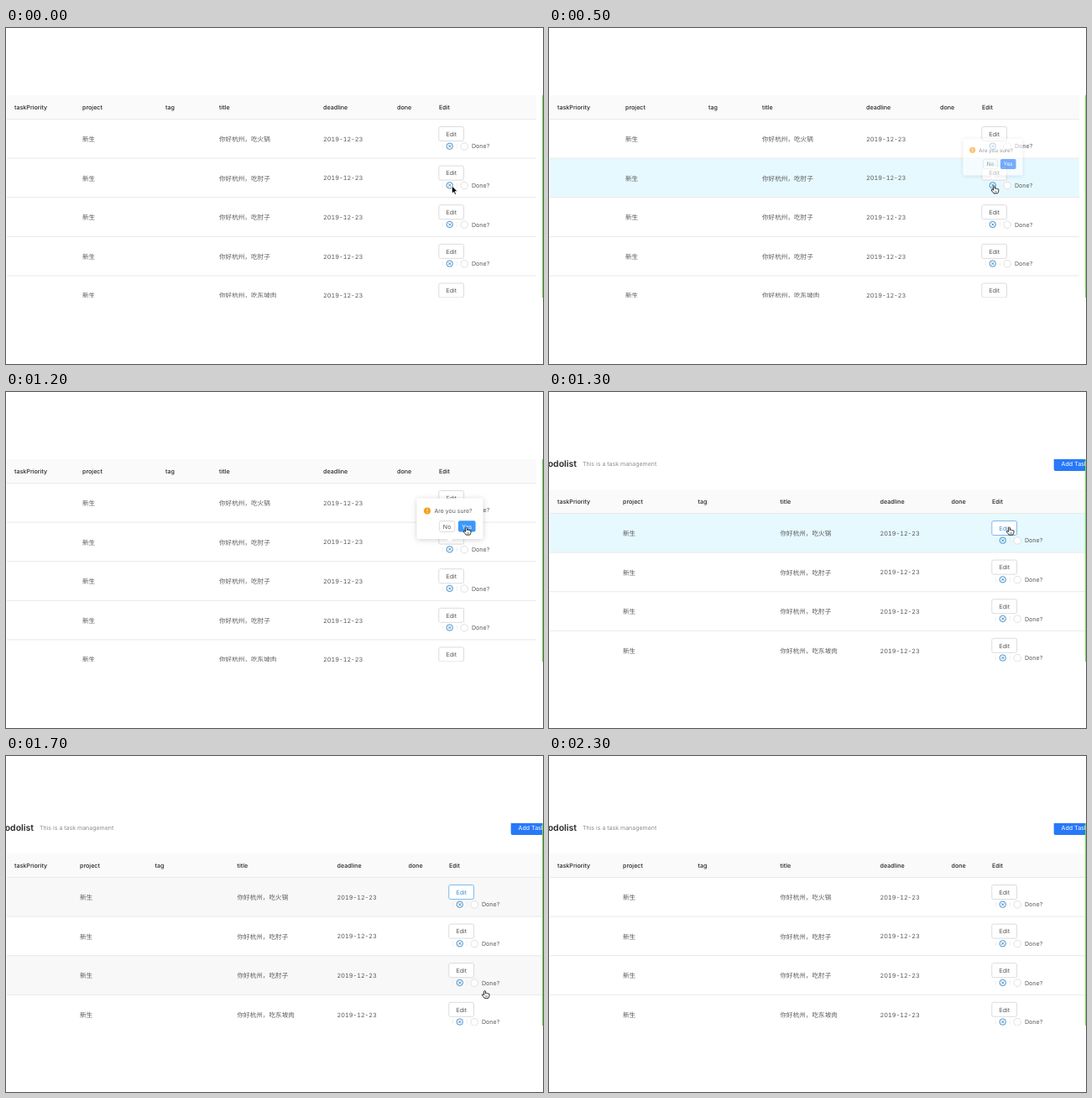
Write an HTML page that moves like this. It is 640 by 400 pixels and loops after 2400 ms.

```html
<!DOCTYPE html>
<html lang="zh-CN">
<head>
<meta charset="utf-8">
<title>Task table</title>
<style>
html, body { margin: 0; width: 100%; height: 100%; overflow: hidden; background: #fff; }
svg { display: block; width: 640px; height: 400px; }
text { font: 7.1px Inter, "Noto Sans CJK SC", sans-serif; fill: #595959; text-rendering: geometricPrecision; }
.head { font-weight: 500; font-size: 7.15px; fill: #262626; }
.cjk { font: 7.6px "Noto Sans CJK SC", "Noto Sans CJK", sans-serif; }
.date { font-size: 7.3px; font-variant-numeric: tabular-nums; }
.brand { font-size: 10.5px; font-weight: 600; fill: #262626; }
.note { font-size: 7px; fill: #8c8c8c; }
.light { fill: #fff; }
.ask { font-size: 6.95px; }
.mid { text-anchor: middle; }
.end { text-anchor: end; }
.shadow { filter: drop-shadow(0 1px 3px rgba(0, 0, 0, .18)); }
</style>
</head>
<body>
<svg viewBox="0 0 640 400">
  <clipPath id="window"><rect y="80" width="640" height="241"/></clipPath>
  <g id="scene" clip-path="url(#window)"></g>
</svg>
<script>
const STEP = 100, LOOP = 2400, ROW = 46.6;
const BLUE = '#2878fa', LINK = '#3585c6';
const scene = document.getElementById('scene');
const HEADS = ['taskPriority', 'project', 'tag', 'title', 'deadline', 'done', 'Edit'];
const HOVER = ['#fff', '#f8f8f8', '#effbff', '#e6f9ff'];

// Each glow string holds one hover level per step, counted from the view's start.
const BEFORE = {
  start: 0, top: 80, width: 631,
  cols: [10, 91, 190, 254, 378, 466, 516],
  titles: ['吃火锅', '吃肘子', '吃肘子', '吃肘子', '吃东坡肉'],
  glow: ['', '0012333333210']
};
const AFTER = {
  start: 13, top: 116, width: 639,
  cols: [10, 88, 177.5, 275.5, 394.5, 479.5, 528],
  titles: ['吃火锅', '吃肘子', '吃肘子', '吃东坡肉'],
  glow: ['33321000000', '00010000000', '00001221100', '00000111000']
};

// step, x, y of the pointer tip
const PATH = [
  [0, 531.5, 188], [3, 530.5, 187.8], [6, 530.5, 187.8], [8, 531, 176.5],
  [10, 540, 168], [12, 548.7, 161], [15, 548.7, 161],
  [17, 570.7, 279.2], [18, 573, 299], [19, 575, 330]
];

const rect = (x, y, w, h, fill, stroke = 'none', r = 0) =>
  `<rect x="${x}" y="${y}" width="${w}" height="${h}" rx="${r}" fill="${fill}" stroke="${stroke}" stroke-width=".9"/>`;
const circle = (x, y, r, fill, stroke = 'none', w = .8) =>
  `<circle cx="${x}" cy="${y}" r="${r}" fill="${fill}" stroke="${stroke}" stroke-width="${w}"/>`;
const path = (d, stroke, w, fill = 'none') =>
  `<path d="${d}" fill="${fill}" stroke="${stroke}" stroke-width="${w}" stroke-linejoin="round"/>`;
const text = (x, y, s, cls = '', fill = '') =>
  `<text x="${x}" y="${y}" class="${cls}"${fill && ` style="fill:${fill}"`}>${s}</text>`;

function actions(x, y, focused) {
  const iy = y + 32.2;
  return rect(x - .2, y + 9, 29.8, 17, '#fff', focused ? '#6fb3e6' : '#d9d9d9', 2)
    + text(x + 14.8, y + 20.2, 'Edit', 'mid', focused ? '#3f8fd2' : '')
    + path(`M${x + 4.5} ${iy - 3}v6M${x + 21.5} ${iy - 3}v6`, '#ececec', .8)
    + circle(x + 12.8, iy, 3.7, 'none', LINK, .9)
    + path(`M${x + 11.3} ${iy - 1.5}l3 3m0 -3l-3 3`, LINK, .9)
    + circle(x + 30.2, iy + .2, 4.3, '#fff', '#d9d9d9')
    + text(x + 39, iy + 2.6, 'Done?');
}

function table(view, step) {
  const { top, width, cols, titles } = view;
  const first = top + 28.5;
  let out = rect(1, top, width, 28.5, '#fafafa');
  out += cols.map((x, i) => text(x, top + 16.9, HEADS[i], 'head')).join('');
  titles.forEach((title, i) => {
    const y = first + i * ROW, base = y + 26.2;
    const level = (view.glow[i] || '')[step - view.start] || 0;
    out += rect(1, y, width, ROW, HOVER[level])
      + path(`M1 ${y}h${width}`, '#e9e9e9', 1)
      + text(cols[1], base + .2, '新生', 'cjk')
      + text(cols[3], base + .2, '你好杭州，' + title, 'cjk')
      + text(cols[4], base, '2019-12-23', 'date')
      + actions(cols[6], y, view === AFTER && i === 0 && step < 21);
  });
  return out;
}

function pageHeader() {
  return text(33, 89, 'Todolist', 'brand end')
    + text(40, 88, 'This is a task management', 'note')
    + rect(601.7, 76.5, 50, 17.5, BLUE, 'none', 2)
    + text(610.5, 88, 'Add Task', 'light');
}

function popover(step) {
  const opening = step === 5;
  const pose = opening ? 'opacity=".6" transform="translate(529 180) scale(.9) translate(-529 -180)"' : '';
  return `<g ${pose}><g class="shadow">${rect(489.5, 126.5, 79, 48.5, '#fff', 'none', 2)}</g>`
    + path('M525 174.5h8l-4 4z', 'none', 0, '#fff')
    + circle(502, 141.5, 4, '#f5a01f')
    + path('M502 139.2v2.8m0 .9v.9', '#fff', .8)
    + text(510.5, 144.1, 'Are you sure?', 'ask')
    + rect(516.4, 153.6, 18.4, 12.8, '#fff', '#d9d9d9', 2)
    + text(525.6, 162.6, 'No', 'mid')
    + rect(539, 153.2, 20.6, 13.4, step >= 11 ? '#3c96fb' : BLUE, 'none', 2)
    + text(549.3, 162.6, 'Yes', 'mid light') + '</g>';
}

function pointerAt(step) {
  const n = PATH.findIndex(p => p[0] >= step);
  if (n < 1) return PATH[0].slice(1);
  const [s0, x0, y0] = PATH[n - 1], [s1, x1, y1] = PATH[n];
  const k = (step - s0) / (s1 - s0);
  return [x0 + (x1 - x0) * k, y0 + (y1 - y0) * k];
}

function pointer(step) {
  if (step > 18) return '';
  const [x, y] = pointerAt(step);
  const arrow = step < 2 || (step > 6 && step < 11);
  const shape = arrow
    ? path('M0 0v9l2.1 -1.9 1.4 3.2 1.5 -.7 -1.4 -3.1h2.9z', '#fff', .7, '#000')
    : path('M-1 .8q1 -1.4 1.9 0v2.6q.9 -.8 1.6 .1q1 -.6 1.5 .3q1.3 -.4 1.3 1v1.6q-.3 1.6 -1.2 2.7h-4.6q-.6 -1.3 -2.3 -2.9q-1.2 -1.6 .1 -1.8q.8 0 1.7 1z', '#111', .9, '#fff')
      + path('M1.2 6v1.8M2.6 6v1.8', '#111', .5);
  return `<g transform="translate(${x} ${y})">${shape}</g>`;
}

function render(step) {
  const view = step < AFTER.start ? BEFORE : AFTER;
  scene.innerHTML = table(view, step)
    + (view === AFTER ? pageHeader() : '')
    + (step >= 5 && view === BEFORE ? popover(step) : '')
    + rect(639, 80, 1, 241, '#72e04e')
    + pointer(step);
}

const begin = performance.now();
let shown = -1;
function tick() {
  const step = Math.floor((performance.now() - begin) % LOOP / STEP);
  if (step !== shown) render(shown = step);
  requestAnimationFrame(tick);
}
tick();
</script>
</body>
</html>
```
